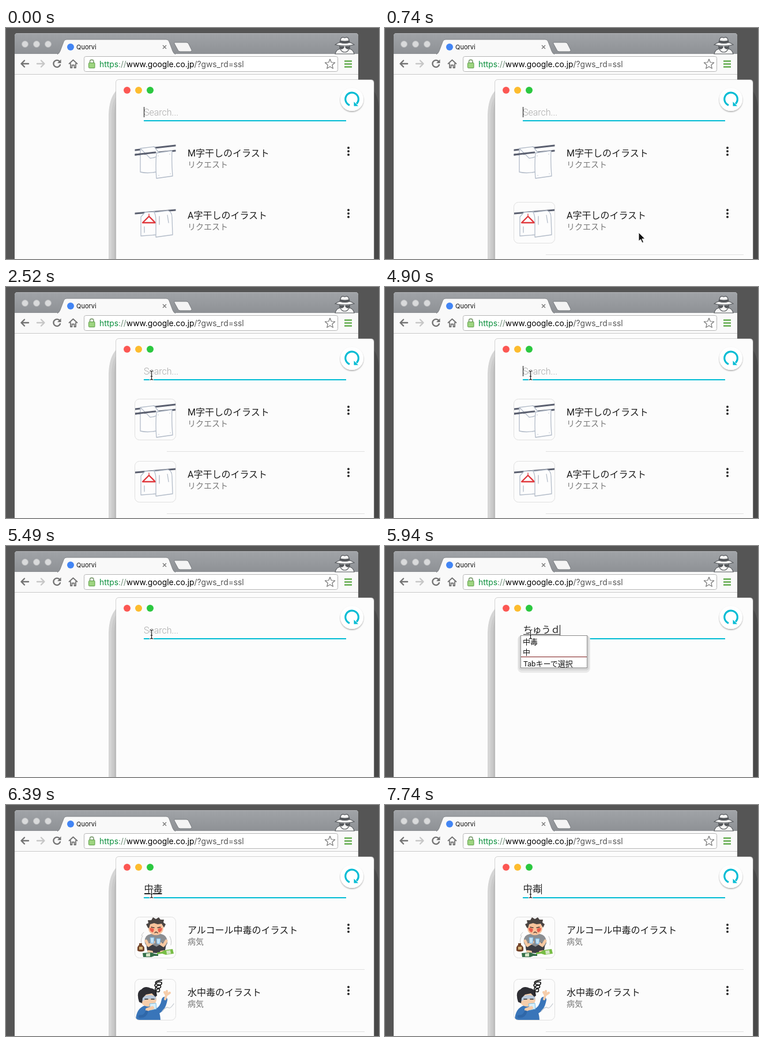
These frames come from a looping animation (647x401 px, 8000 ms). An HTML page:

```html
<!DOCTYPE html>
<html lang="ja">
<head>
<meta charset="utf-8">
<title>Search</title>
<style>
html, body { margin: 0; width: 100%; height: 100%; overflow: hidden; background: #555; }
svg { display: block; width: 100vw; height: 100vh; }
text { white-space: pre; }
.ui { font-family: Inter, "Open Sans", sans-serif; }
.jp { font-family: Roboto, "Noto Sans CJK JP", "Noto Sans CJK", sans-serif; }
.line { fill: none; stroke-linecap: round; stroke-linejoin: round; }
</style>
</head>
<body>
<svg viewBox="0 0 647 401">
  <defs>
    <linearGradient id="bar" x2="0" y2="1">
      <stop stop-color="#a0a3a7"/><stop offset="1" stop-color="#8e9195"/>
    </linearGradient>
    <clipPath id="thumb"><rect width="71" height="71" x=".5" y=".5" rx="8"/></clipPath>
    <filter id="soft" x="-30%" y="-30%" width="160%" height="170%">
      <feDropShadow dx="0" dy="1.5" stdDeviation="1" flood-opacity=".35"/>
    </filter>

    <g id="towelM" class="line" stroke="#b3bcc9" stroke-width="1.3">
      <path d="M1 18 71 10M1 26 71 19" stroke="#5b6070" stroke-width="3"/>
      <path d="M10 15 34 12 44 25Q36 32 27 32Q19 24 10 15V56Q22 59 37 56" fill="#fdfdfd"/>
      <path d="M1 26 36 22" stroke="#5b6070" stroke-width="3"/>
      <path d="M38 23 65 19Q64 40 66 63L38 67Q36 45 38 23Z" fill="#fdfdfd"/>
      <path d="M41 28h.1M42 62h.1M61 25h.1M62 59h.1"/>
    </g>
    <g id="towelA" class="line" stroke="#b3bcc9" stroke-width="1.3">
      <path d="M1 20 71 14" stroke="#5b6070" stroke-width="3"/>
      <path d="M11 26 18 18 35 17 39 30 38 57 11 59Z" fill="#fdfdfd"/>
      <path d="M14 36 25 25 36 36Z" stroke="#e0393e" stroke-width="2.3"/>
      <path d="M25 25V21" stroke="#e0393e"/>
      <path d="M34 18 58 15Q65 17 65 27L66 57 37 61V32Q37 23 34 18Z" fill="#fdfdfd"/>
      <path d="M43 25V39M57 23 59 36M17 43V53"/>
    </g>
    <g id="drinker">
      <path d="M18 46Q16 32 28 30H46Q57 32 57 46L52 56H24Z" fill="#8b8e92"/>
      <path d="M23 61Q18 48 25 45L38 52 49 45Q57 48 52 61Q38 65 23 61Z" fill="#3c3d43"/>
      <path d="M20 42 24 50 33 44M55 42 50 50 41 44" class="line" stroke="#f5c8a2" stroke-width="5"/>
      <path d="M24 60 30 61M46 61 52 60" class="line" stroke="#f5c8a2" stroke-width="4"/>
      <ellipse cx="37" cy="20" rx="13" ry="12" fill="#f7c39c"/>
      <path d="M23 19 20 13 24 11 23 6 29 6 32 1 37 4 42 1 45 5 51 5 50 10 54 13 51 19 47 12 40 13 34 11 27 13 25 20Z" fill="#4a4442"/>
      <path d="M26 20Q31 18 34 22L32 27Q27 27 26 20ZM48 20Q43 18 40 22L42 27Q47 27 48 20Z" fill="#ea5f4c"/>
      <path d="M29 18 34 19M40 19 45 18M35 28Q37 25 40 28" class="line" stroke="#493530" stroke-width="1.3"/>
      <path d="M27 36H34L33 46H28Z" fill="#c3e3f5" stroke="#72aee0"/>
      <path d="M38 38H45L44 47H39Z" fill="#c3e3f5" stroke="#72aee0"/>
      <path d="M14 33Q10 40 12 46M61 34Q65 41 63 49M16 27Q13 29 12 33" class="line" stroke="#c4c4c4"/>
      <path d="M8 46H13V49Q18 51 17 59Q11 62 5 59Q4 51 8 49Z" fill="#74452a"/><path d="M8 52H14V57H8Z" fill="#d9b779"/>
      <path d="M14 63 29 62 34 64 41 65V68L34 68 29 70 15 70Z" fill="#35704a"/>
      <path d="M39 62 47 61 52 58 66 56 68 64 54 66 48 64 39 65Z" fill="#78bd45"/>
      <path d="M20 64 27 63V69H20ZM55 59 62 58 63 64 56 65Z" fill="#d7e7c7"/>
    </g>
    <g id="waterMan">
      <path d="M2 71Q3 51 18 46L34 47Q44 52 45 71Z" fill="#3975b9"/>
      <path d="M37 57Q49 53 52 36" class="line" stroke="#3975b9" stroke-width="10"/>
      <path d="M53 35 55 28M55 28 52 23M55 28 56 21M55 28 61 24" class="line" stroke="#f6cdaa" stroke-width="4"/>
      <ellipse cx="24" cy="35" rx="14" ry="13" fill="#f6cdaa"/>
      <path d="M12 33Q22 25 37 30V36Q24 32 13 39Z" fill="#b9c9dc"/>
      <path d="M8 40Q2 22 12 18Q18 11 28 16Q38 17 39 29L36 31 30 25 20 27 14 33 13 42Z" fill="#2e2e34"/>
      <path d="M18 35H23M29 35H34" class="line" stroke="#333" stroke-width="1.6"/>
      <path d="M26 43 37 42 38 52 28 54Z" fill="#d5effc" stroke="#7ebde0"/>
      <path d="M22 53 31 50" class="line" stroke="#f6cdaa" stroke-width="6"/>
      <path d="M9 65Q18 66 21 57" class="line" stroke="#2f67a8" stroke-width="5"/>
      <path d="M47 2Q32 4 38 9Q48 13 47 6Q39 3 35 11Q37 18 45 15Q47 9 39 12Q33 18 38 22Q45 24 43 17Q36 16 37 27" class="line" stroke="#222" stroke-width="1.8"/>
      <path d="M48 56Q55 47 59 50Q62 52 68 43" class="line" stroke="#c5cbd0" stroke-width="1.3"/>
    </g>
  </defs>

  <!-- Browser -->
  <path d="M15 401V14Q15 9 20 9H606Q611 9 611 14V401Z" fill="#fcfcfc"/>
  <path d="M15 46V14Q15 9 20 9H606Q611 9 611 14V46Z" fill="url(#bar)"/>
  <path d="M19 9.5H607" stroke="#b4b6b9"/>
  <g fill="#d9dadb" stroke="#b9bbbd">
    <circle cx="33" cy="28" r="5.5"/><circle cx="53" cy="28" r="5.5"/><circle cx="73" cy="28" r="5.5"/>
  </g>
  <path d="M15 45H611V81H15Z" fill="#f9f9f9"/>
  <path d="M15 80.5H611" stroke="#c9c9c9"/>
  <path d="M89 45.5Q92 45 94 40L100 24Q101 20 105 20H278Q282 20 283 24L289 40Q291 45 294 45.5Z" fill="#f9f9f9" stroke="#777a7e" stroke-width=".8"/>
  <path d="M90 46H293" stroke="#f9f9f9" stroke-width="2"/>
  <path d="M293 25H313Q316 25 317 28L322 38Q323 41 320 41H302Q299 41 298 38L292 27Q291 25 293 25Z" fill="#f4f4f4" stroke="#777a7e"/>
  <circle cx="112" cy="33" r="6" fill="#4285f4"/>
  <text x="122" y="37" class="ui" font-size="11" fill="#111">Quorvi</text>
  <path d="M272 30 278 36M278 30 272 36" stroke="#777" stroke-width="1.4"/>
  <g stroke="#55585c" stroke-width="1.2" fill="#f4f4f4">
    <path d="M571 45Q573 37 580 36H595Q602 37 604 45Z"/>
    <path d="M579 29H596V35Q593 42 587.5 42Q582 42 579 35Z"/>
    <path d="M571 29Q575 26 579 25L581 18Q583 15 587.5 17Q592 15 594 18L596 25Q600 26 604 29Q588 33 571 29Z"/>
    <path d="M579 25 580 22Q588 24 595 22L596 25Q588 28 579 25Z" fill="#55585c"/>
    <path d="M579 32H586V34Q583 38 579.5 35ZM589 32H596L595.5 35Q592 38 589 34Z" fill="#55585c"/>
  </g>
  <g class="line" stroke="#737373" stroke-width="2.4">
    <path d="M39 62H27M32 56.5 26.5 62 32 67.5"/>
    <path d="M54 62H66M61 56.5 66.5 62 61 67.5" stroke="#c7c7c7"/>
    <path d="M93 58A6 6 0 1 0 94 64"/>
    <path d="M109.5 62 116.5 55.5 123.5 62M112 62V69H114.5V64.500H118.5V69H121V62" stroke-width="1.8"/>
  </g>
  <path d="M95.5 54.5V61H89Z" fill="#737373"/>
  <rect x="135.5" y="49.5" width="440" height="26" rx="3" fill="#fff" stroke="#b5b5b5"/>
  <path d="M145.5 62V58A3.3 3.300 0 0 1 152 58V62" fill="none" stroke="#8aa57f" stroke-width="1.8"/>
  <rect x="143.500" y="60.500" width="10.500" height="9" rx="1" fill="#9dd480" stroke="#5a9b45"/>
  <text x="162" y="67.5" class="ui" font-size="13.8" fill="#000"><tspan fill="#0b8f3c">https</tspan><tspan fill="#6f8f78">://</tspan>www.google.co.jp<tspan fill="#555">/?gws_rd=ssl</tspan></text>
  <path id="star" fill="#fff" stroke="#777" stroke-width="1.2" stroke-linejoin="round"/>
  <path d="M587 57.5H600M587 62.5H600M587 67.5H600" stroke="#61ab4c" stroke-width="2.6"/>

  <!-- App window -->
  <path d="M178 401V150Q179 121 192 108V401Z" fill="#d5d5d5"/>
  <path d="M183 401V150Q184 127 192 118V401Z" fill="#cbcbcb"/>
  <path d="M187 401V150Q188 133 192 126V401Z" fill="#c0c0c0"/>
  <path d="M637 401V108Q645 118 647 136V401Z" fill="#484848"/>
  <path d="M191 401V95Q191 90 196 90H633Q638 90 638 95V401Z" fill="#fcfcfc"/>
  <path d="M190.5 401V95Q190.5 89.5 196 89.5H633Q638.5 89.5 638.5 95V401" fill="none" stroke="#aaa" stroke-opacity=".5"/>
  <circle cx="210" cy="108" r="6" fill="#fc5753"/>
  <circle cx="230" cy="108" r="6" fill="#fdbc2e"/>
  <circle cx="250" cy="108" r="6" fill="#2bc840"/>
  <path d="M239 161H590" stroke="#00bcd4" stroke-width="2"/>
  <circle cx="600" cy="124" r="20" fill="#fff" filter="url(#soft)"/>
  <path d="M596 134A11.3 11.3 0 1 1 608 131.5" fill="none" stroke="#00bcd4" stroke-width="3.2"/>
  <path d="M603.5 128V135.5H611Z" fill="#00bcd4"/>

  <g id="lists"></g>
  <text id="hint" x="239" y="152" class="jp" font-size="16" font-weight="300" fill="#aaa">Search...</text>
  <text id="query" x="239.5" y="151" class="jp" font-size="16" fill="#222"></text>
  <path id="under" stroke="#222"/>
  <g id="popup" class="jp" font-size="13" fill="#111">
    <rect x="230" y="155" width="126" height="65" rx="8" fill="#e9e9e9"/>
    <rect x="232" y="155" width="122" height="61" rx="5" fill="#d6d6d6"/>
    <rect x="235.5" y="155.5" width="115" height="56" fill="#fff" stroke="#8c8c8c"/>
    <text id="pick0" x="239" y="171"></text>
    <text id="pick1" x="239" y="189"></text>
    <path d="M236 192.5H350" stroke="#7d1a1a"/>
    <text x="240" y="208.5">Tabキーで選択</text>
  </g>
  <path id="caret" stroke="#111"/>
  <path id="arrow" d="M0 0V15L3.5 12 6 18 8.5 17 6 11H11Z" fill="#111" stroke="#fff"/>
  <g id="beam" class="line">
    <path id="ibeam" d="M-2.5-7.500Q0-7.500 0-5.500Q0-7.500 2.5-7.500M0-5.500V6M-2.5 8Q0 8 0 6Q0 8 2.5 8M-1.5 2H1.5"/>
    <use href="#ibeam" stroke="#fff" stroke-width="2.6"/>
    <use href="#ibeam" stroke="#111" stroke-width="1.1"/>
  </g>
</svg>
<script>
const LOOP = 8000;
const $ = id => document.getElementById(id);
const show = (el, on) => { el.style.display = on ? '' : 'none'; };

const row = (art, title, sub, y, n) => `
  <g transform="translate(223 ${y})">
    <g clip-path="url(#thumb)"><use href="#${art}"/></g>
    <g class="edge${n}" fill="none" stroke="#e0e0e0">
      <rect x=".5" y=".5" width="71" height="71" rx="8"/><path d="M56 91.5H399"/>
    </g>
    <text x="92" y="28.5" class="jp" font-size="16" fill="#1c1c1c">${title}</text>
    <text x="92" y="48" class="jp" font-size="14" fill="#777">${sub}</text>
    ${[14, 20, 26].map(cy => `<circle cx="371" cy="${cy}" r="2" fill="#2b2b2b"/>`).join('')}
  </g>`;
const list = (id, a, b) => `<g id="${id}">${row(...a, 194, 1)}${row(...b, 302, 2)}</g>`;
$('lists').innerHTML =
  list('recent', ['towelM', 'M字干しのイラスト', 'リクエスト'], ['towelA', 'A字干しのイラスト', 'リクエスト']) +
  list('found', ['drinker', 'アルコール中毒のイラスト', '病気'], ['waterMan', '水中毒のイラスト', '病気']);

$('star').setAttribute('d', 'M' + Array.from({ length: 10 }, (_, i) => {
  const r = i % 2 ? 4 : 9, a = i * Math.PI / 5;
  return `${562 + r * Math.sin(a)} ${63 - r * Math.cos(a)}`;
}).join('L') + 'Z');

// Each step changes only the listed fields; under is the underline weight.
const steps = [
  [0, { list: 'recent', edge1: false, edge2: false, text: '', caret: true, under: 0, picks: null, arrow: null, beam: null }],
  [590, { edge2: true }],
  [740, { arrow: [440, 355] }],
  [890, { arrow: [440, 241], edge1: true }],
  [1040, { arrow: [391, 220] }],
  [1180, { arrow: null, beam: [251.5, 155] }],
  [1330, { beam: [252.5, 153] }],
  ...[1480, 1920, 2520, 2970, 3410, 4010, 4450, 4900].map((t, i) => [t, { caret: i % 2 === 1 }]),
  [5490, { caret: false, list: '' }],
  [5640, { text: 'ち', caret: true, under: 1 }],
  [5790, { text: 'ちゅう' }],
  [5940, { text: 'ちゅうｄ', picks: ['中毒', '中'] }],
  [6090, { text: 'ちゅうど', picks: ['中毒', '中途'] }],
  [6240, { text: '中毒', picks: null, under: 2 }],
  [6390, { caret: false, list: 'found' }],
  [6840, { caret: true, under: 0 }],
  [7290, { caret: false }],
  [7740, { caret: true }],
];
let merged = {};
const states = steps.map(([at, change]) => ({ at, s: merged = { ...merged, ...change } }));

function place(el, pos) {
  show(el, pos);
  if (pos) el.setAttribute('transform', `translate(${pos})`);
}

function draw(s) {
  for (const id of ['recent', 'found']) show($(id), s.list === id);
  for (const n of [1, 2]) show($('recent').querySelector('.edge' + n), s['edge' + n]);
  show($('hint'), !s.text);
  $('query').textContent = s.text;
  const end = 239.5 + 16 * s.text.length;
  show($('caret'), s.caret);
  $('caret').setAttribute('d', `M${end} 137V155`);
  $('under').setAttribute('d', `M240 ${153 + s.under / 2}H${end - 1}`);
  $('under').setAttribute('stroke-width', s.under);
  show($('popup'), s.picks);
  (s.picks || []).forEach((word, i) => { $('pick' + i).textContent = word; });
  place($('arrow'), s.arrow);
  place($('beam'), s.beam);
}

const start = performance.now();
let shown;
function tick() {
  const t = (performance.now() - start) % LOOP;
  const { s } = states.findLast(step => step.at <= t);
  if (s !== shown) draw(shown = s);
  requestAnimationFrame(tick);
}
tick();
</script>
</body>
</html>
```
